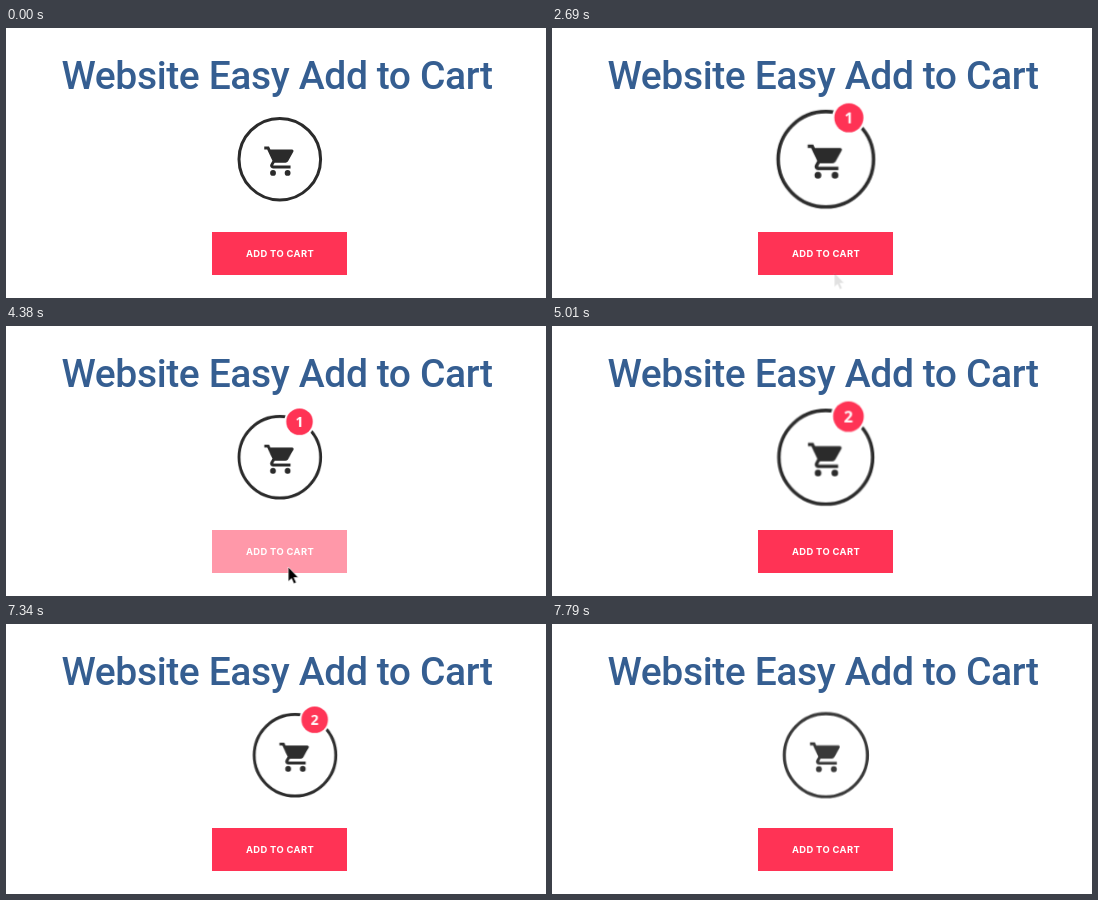
Animation, 540 px wide and 270 px high, one loop 7.82 s. Source, as an HTML page:

```html
<!DOCTYPE html>
<html lang="en">
<head>
<meta charset="utf-8">
<title>Add to Cart</title>
<style>
  html, body { margin: 0; width: 100%; height: 100%; overflow: hidden; background: #fff; }
  svg { display: block; width: 100vw; height: 100vh; }
  svg * { animation: 7820ms linear infinite; }

  .title { font: 500 39px Roboto, sans-serif; letter-spacing: -.4px; fill: #355e91; }
  .label { font: 700 9.4px Inter, sans-serif; letter-spacing: .35px; fill: #fff; text-anchor: middle; }
  .count { font: 700 14px "Open Sans", sans-serif; fill: #fff; text-anchor: middle; }
  .red { fill: #ff3355; }
  .dark { fill: #2b2b2b; }

  .cart { transform-origin: 273.8px 131.2px; animation-name: cart; }
  .badge { transform-origin: 293.5px 95.7px; animation-name: badge; }
  .one { animation-name: one; animation-timing-function: step-end; }
  .two { animation-name: two; animation-timing-function: step-end; }
  .button { animation-name: hover; }
  .cursor { animation-name: cursor; }

  /* pulse at 2.48 s and 4.68 s, slide out at 7.34 s, zoom in at 7.7 s */
  @keyframes cart {
    0%, 31.6% { transform: none; animation-timing-function: ease-out; }
    34.6% { transform: scale(1.17); animation-timing-function: ease-in-out; }
    40.15%, 59.7% { transform: none; animation-timing-function: ease-out; }
    62.7% { transform: scale(1.17); animation-timing-function: ease-in-out; }
    68.29%, 93.84% { transform: none; opacity: 1; }
    93.85% { transform: translateX(16px); opacity: 1; }
    96.54% { transform: translateX(-76px); opacity: 0; }
    96.55%, 98.44% { transform: scale(1.2); opacity: 0; }
    98.45% { transform: scale(1.2); opacity: .3; }
    99.75%, 100% { transform: none; opacity: 1; }
  }
  @keyframes badge {
    0%, 31.6% { transform: scale(0); }
    34.6%, 96.54% { transform: none; }
    96.55%, 100% { transform: scale(0); }
  }
  @keyframes one { 0% { opacity: 1; } 61.2%, 100% { opacity: 0; } }
  @keyframes two { 0% { opacity: 0; } 61.2%, 100% { opacity: 1; } }
  @keyframes hover {
    0%, 26.4% { opacity: 1; }
    27.88%, 31.6% { opacity: .5; }
    34.4%, 54.4% { opacity: 1; }
    56.01%, 59.7% { opacity: .5; }
    62.5%, 100% { opacity: 1; }
  }
  @keyframes cursor {
    0%, 25.9% { transform: translate(282.3px, 272px); opacity: 1; }
    25.95% { transform: translate(282.3px, 268px); animation-timing-function: ease-out; }
    27.88%, 31.6% { transform: translate(282.3px, 241px); opacity: 1; }
    34.4% { transform: translate(282.3px, 241px); opacity: 0; }
    34.5%, 53.65% { transform: translate(282.3px, 272px); opacity: 1; }
    53.7% { transform: translate(282.3px, 268px); animation-timing-function: ease-out; }
    56.01%, 59.7% { transform: translate(282.3px, 241px); opacity: 1; }
    62.5% { transform: translate(282.3px, 241px); opacity: 0; }
    62.6%, 100% { transform: translate(282.3px, 272px); opacity: 1; }
  }
</style>
</head>
<body>
<svg viewBox="0 0 540 270">
  <text class="title" x="55.5" y="61">Website Easy Add to Cart</text>

  <g class="cart">
    <circle cx="273.8" cy="131.2" r="40.8" fill="none" stroke="#2b2b2b" stroke-width="3"/>
    <path class="dark" transform="translate(256.8 115.7) scale(1.46)"
      d="M1 2v2h2l3.6 7.6-1.35 2.45A2 2 0 0 0 7 17h12v-2H7.4a.25.25 0 0 1-.2-.37L8.1 13h7.45a2 2 0 0 0 1.75-1l3.6-6.5A1 1 0 0 0 20 4H5.2l-.93-2zM7 18a2 2 0 1 0 0 4 2 2 0 0 0 0-4zm10 0a2 2 0 1 0 0 4 2 2 0 0 0 0-4z"/>
    <g class="badge">
      <circle cx="293.5" cy="95.7" r="15.4" fill="#fff"/>
      <circle class="red" cx="293.5" cy="95.7" r="13.3"/>
      <text class="count one" x="293.5" y="100.6">1</text>
      <text class="count two" x="293.5" y="100.6">2</text>
    </g>
  </g>

  <rect class="button red" x="206" y="204" width="135" height="43"/>
  <text class="label" x="274" y="229">ADD TO CART</text>

  <path class="cursor" d="M0 0V14.5L3.3 11.5 5.6 16.7 8 15.6 5.7 10.6H10z" stroke="#fff" stroke-width=".6"/>
</svg>
</body>
</html>
```
